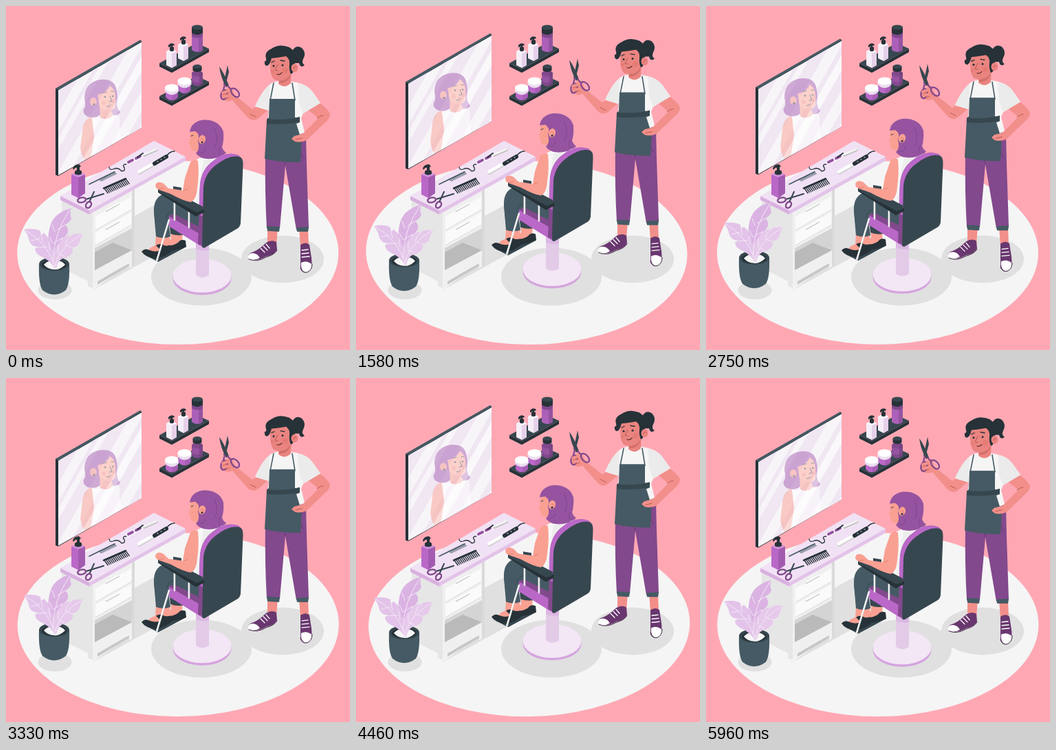
Write an HTML page that moves like this. It is 500 px wide and 500 px high and loops after 6000 ms.

```html
<!DOCTYPE html>
<html lang="en">
<head>
<meta charset="utf-8">
<title>Hair salon</title>
<style>
html, body { margin: 0; width: 100%; height: 100%; overflow: hidden; background: #ffa8b4; }
svg { display: block; width: 100%; height: 100%; }
.line { fill: none; stroke-linecap: round; stroke-linejoin: round; }
</style>
</head>
<body>
<svg viewBox="0 0 500 500">
<defs>
  <clipPath id="glass"><path d="M76 122.500 197 52.500V177L76 246Z"/></clipPath>
  <g id="shelf">
    <path fill="#263238" d="M223 83 241 92 295 62V67L241 97 223 88Z"/>
    <path fill="#37474f" d="M223 83 277 54 295 62 241 92Z"/>
  </g>
  <g id="pump">
    <path fill="#f5edf7" d="M233 66 241 62 248 66V86L241 90 233 86Z"/>
    <path fill="#e6d0ea" d="M241 69 248 66V86L241 90Z"/>
    <path fill="#faf4fb" d="M233 66 241 62 248 66 241 69Z"/>
    <path fill="#263238" d="M238 60Q241 58 244 60V65Q241 67 238 65ZM240 55H242V61H240ZM236 57Q239 53 244 55L245 57Q241 58 236 60Z"/>
  </g>
  <g id="jar">
    <path fill="#ba68c8" d="M232 123V132Q235 137 241 137 247 137 250 132V123Z"/>
    <path fill="#9553a0" opacity=".45" d="M241 137Q247 137 250 132V123H244Z"/>
    <path fill="#efe3f1" d="M231 119V124Q235 129 241 129 247 129 251 124V119Z"/>
    <ellipse cx="241" cy="119" rx="10" ry="5.500" fill="#fff"/>
    <path class="line" stroke="#d5c4da" stroke-width=".6" d="M234 124v3M237 125v3M241 126v3M245 125v3M248 124v3"/>
  </g>
</defs>

<ellipse id="floor" cx="249.800" cy="358.500" rx="233.500" ry="133.500" fill="#f5f5f5"/>
<g fill="#e0e0e0">
  <path d="M124 414 240 350V276L187 305V370Z"/>
  <ellipse cx="284" cy="393.500" rx="73" ry="42"/>
  <ellipse cx="402" cy="368" rx="60" ry="34.500"/>
  <ellipse cx="71" cy="413" rx="24.500" ry="13.500"/>
</g>

<!-- mirror -->
<g class="float">
  <path fill="#263238" d="M72 120 195 49.500 197 51V177L76 247 72 245.500Z"/>
  <path fill="#455a64" d="M72 120 195 49.500 197 51.500 76 122Z"/>
  <g clip-path="url(#glass)">
    <path fill="#f8f5f9" d="M70 40H200V250H70Z"/>
    <g id="stripes" fill="#f0e7f3"></g>
    <g opacity=".5">
      <path fill="#f9a092" d="M124 161Q112 166 111 182L108 207Q110 220 118 230L136 222 126 205 130 180Z"/>
      <path fill="#fff" d="M125 163Q138 166 151 157L161 155Q167 160 165 172L168 202 122 228 128 190Z"/>
      <path fill="#a661b2" d="M114 135Q114 111 137 107 156 105 160 119 163 132 161 143 162 150 166 154 164 159 156 159L137 158Q130 164 119 161 111 157 113 150 117 146 114 135Z"/>
      <path fill="#f9a092" d="M136 143 152 151 156 158Q148 168 137 162Z"/>
      <path fill="#ffad9e" d="M133 129Q146 127 151 116 159 121 159.500 133L159 147Q153 154 147 152L136 146Z"/>
      <ellipse cx="127" cy="139" rx="5" ry="6" fill="#f9a092"/>
      <path class="line" stroke="#37474f" stroke-width="1" d="M141 126 146 125M153 124 157 124M146 146Q150 147 152 144M151 131 154 138 150 139"/>
      <g fill="#37474f"><circle cx="144" cy="132" r="1.300"/><circle cx="155" cy="131" r="1.200"/><circle cx="128" cy="143" r="1.600"/></g>
      <g fill="#f47d72" opacity=".5"><circle cx="142" cy="141" r="3"/><circle cx="156" cy="139" r="2"/></g>
    </g>
    <path fill="#fff" opacity=".3" d="M96 250 216 40H228L108 250Z"/>
  </g>
</g>

<!-- shelves -->
<use href="#shelf"/>
<use href="#shelf" y="48"/>
<use href="#pump"/>
<use href="#pump" x="17" y="-10"/>
<path fill="#ac60b9" d="M270 39V64Q278 70 286 64V39Z"/>
<path fill="#9553a0" d="M280 40H286V64Q283 67 280 67Z"/>
<path fill="#82498c" d="M270 39V44Q278 49 286 44V39Z"/>
<path fill="#263238" d="M270 31V39Q278 45 286 39V31Z"/>
<ellipse cx="278" cy="31" rx="8" ry="3.500" fill="#37474f"/>
<use href="#jar"/>
<use href="#jar" x="18.500" y="-10"/>
<path fill="#82498c" d="M270 97Q272 94 278 94 284 94 286 97V113Q278 120 270 113Z"/>
<path fill="#9553a0" d="M270 100Q278 105 286 100V109Q278 114 270 109Z"/>
<path fill="#6e3d77" d="M281 95 286 97V113L281 116Z" opacity=".6"/>
<path fill="#263238" d="M271.500 88V94Q278 98 284.500 94V88Z"/>
<ellipse cx="278" cy="88" rx="6.500" ry="3" fill="#37474f"/>

<!-- desk -->
<path fill="#c7c7c7" d="M130 402 178 374 182 376 130 407Z"/>
<path fill="#e6e6e6" d="M81 280 126 302V410L119 407V400L88 384V390L81 386Z"/>
<path fill="#f0f0f0" d="M126 301 187 266V377L179 381V374L133 399V406L126 410Z"/>
<path fill="#dadada" d="M183 268 187 266V377L183 379Z"/>
<path fill="#fafafa" d="M130 306 182 277V295L130 325ZM130 329 182 300V317L130 347Z"/>
<path class="line" stroke="#dedede" d="M130 326 182 296.500M130 348 182 319"/>
<path class="line" stroke="#d0d0d0" stroke-width="2.500" d="M146 298 164 288M146 324 164 314"/>
<path class="line" stroke="#fff" stroke-width="1.500" d="M146 296.500 164 286.500M146 322.500 164 312.500"/>
<path fill="#d4d4d4" d="M129 352 183 323V354L129 383Z"/>
<path fill="#bababa" d="M129 358 155 344 183 355 129 384Z"/>
<path fill="#d9b0e0" d="M79 276 121 297V303L79 282Z"/>
<path fill="#e3c3e9" d="M121 297 261 219V225L121 303Z"/>
<path fill="#f1e1f4" d="M79 276 215 196 261 219 121 297Z"/>

<!-- tools -->
<g class="line">
  <path stroke="#455a64" stroke-width="1.700" d="M121 259 158 241"/>
  <path id="finecomb" stroke="#455a64" stroke-width="1"/>
  <path stroke="#263238" stroke-width="2.500" d="M142 265 174 251"/>
  <path id="widecomb" stroke="#263238" stroke-width="1.400"/>
  <path stroke="#263238" stroke-width="1.300" d="M175 230Q168 230 172 235 174 240 168 240 163 234 156 237 150 239 150 234"/>
  <path stroke="#fff" stroke-width="5" d="M177 228 199 217"/>
  <path stroke="#9553a0" stroke-width="4" d="M178 227 184 224M189 221.500 195 218.500"/>
  <path stroke="#bdbdbd" stroke-width="4" d="M201 217 219 209"/>
  <path stroke="#f5f5f5" stroke-width="2.500" d="M200 216 219 208"/>
  <path stroke="#263238" stroke-width="2" d="M191 220 199 214"/>
  <path stroke="#cfcfcf" stroke-width="6" d="M194 242 216 229"/>
  <path stroke="#fff" stroke-width="4.500" d="M193 241 216 228"/>
  <path stroke="#263238" stroke-width="6" d="M216 229 233 219"/>
  <path stroke="#263238" stroke-width="1.500" d="M234 217Q239 211 245 211"/>
  <path stroke="#fff" stroke-width="1.200" d="M220 226h1M225 223h1M230 220h1"/>
  <path stroke="#37474f" stroke-width="2" d="M116 281 142 273M121 285 128 270"/>
  <g stroke="#82498c" stroke-width="2.400">
    <ellipse cx="110" cy="282" rx="6" ry="3.500" transform="rotate(-12 110 282)"/>
    <ellipse cx="120" cy="289" rx="3.500" ry="5" transform="rotate(35 120 289)"/>
  </g>
</g>
<path fill="#ba68c8" d="M95 245 105 240 115 245V272L105 279 95 274Z"/>
<path fill="#a35bb0" d="M105 249 115 245V272L105 279Z"/>
<path fill="#cf93d9" d="M95 245 105 240 115 245 105 249Z"/>
<path fill="#263238" d="M100 240Q105 236 110 240V244Q105 247 100 244ZM103 233H107V240H103ZM97 236Q99 230 106 230L109 233Q106 236 101 235L98 238Z"/>

<!-- plant -->
<g id="plant">
  <path fill="#455a64" d="M48 375Q47 404 53 413 70 426 87 413 93 404 92 375Z"/>
  <ellipse cx="70" cy="375" rx="22" ry="10" fill="#37474f"/>
  <ellipse cx="70" cy="376" rx="18" ry="7.500" fill="#263238"/>
  <path fill="#f5f5f5" d="M55 376Q62 368 70 372 80 368 86 376 78 384 70 383 61 383 55 376Z"/>
  <path fill="#dbb3e3" d="M66 375Q59 348 62 330 64 313 73 305 82 297 95 294 92 301 95 309 92 315 86 318 91 322 90 329 87 336 81 338 76 350 72 368Z"/>
  <path fill="#e3c3e9" d="M70 379Q62 369 53 365 43 361 42 353L47 350Q37 350 34 342 32 332 26 325 40 322 50 327L51 333 55 330Q65 338 66 350 72 362 73 378Z"/>
  <path fill="#e6c9eb" d="M70 381Q66 358 76 345 84 335 93 333L91 338 97 332Q104 330 112 331 108 337 106 345 103 351 95 351 99 354 96 359 90 366 82 367 75 371 73 381Z"/>
  <g class="line" stroke="#f5e9f7" stroke-width="1">
    <path d="M68 373Q69 330 93 296M68 345 63 335M71 328 67 318M69 345 82 337M75 325 86 318"/>
    <path d="M71 377Q58 342 28 326M60 350 47 351M64 356 62 344M49 338 37 341M53 342 51 333"/>
    <path d="M71 380Q76 352 110 332M76 360 85 364M76 358 76 348M86 348 95 351M86 347 90 338"/>
  </g>
</g>

<!-- chair and client -->
<g class="float">
  <path fill="#d5a4de" d="M242.500 391V396A42.500 24 0 0 0 327.500 396V391Z"/>
  <ellipse cx="285" cy="392" rx="42.500" ry="24.500" fill="#f3e6f5"/>
  <path fill="#e3cbe8" d="M276 335H295V391Q285.500 398 276 391Z"/>
  <path fill="#d5a4de" opacity=".5" d="M276 340H295V355Q285 357 276 353Z"/>
  <path fill="#37474f" d="M208 365 243 345 262 350 221 372Z"/>
  <path fill="#f9a092" d="M240 324 257 328 256 344Q246 352 226 349 230 342 240 339ZM218 332 239 332 236 351Q224 361 207 357 207 351 217 348Z"/>
  <path fill="#263238" d="M218 348Q224 344 230 348 240 350 250 344 254 338 261 341L262 350Q244 358 226 356ZM197 357Q202 351 209 355 218 359 228 354 232 347 240 348L240 357Q230 365 218 367 203 366 197 357Z"/>
  <path fill="#37474f" d="M243 262 255 264V273L243 268Z"/>
  <path fill="#37474f" d="M236 300 262 310 260 332Q250 335 239 331Z"/>
  <path fill="#82498c" d="M230 290 246 290 285 314V336L230 306Z"/>
  <path fill="#ba68c8" d="M230 302 285 333V350L232 317Q229 313 230 302Z"/>
  <path fill="#455a64" d="M215 300Q214 282 225 275 238 271 255 278L283 290V322L248 304Q239 301 235 308L239 335Q228 339 218 335Z"/>
  <path fill="#ba68c8" d="M230 303 285 334V350L232 317Q229 313 230 303Z" />
  <path fill="#455a64" d="M215 300 230 290 237 307 236 336Q228 338 219 335Z"/>
  <path class="line" stroke="#37474f" d="M233 307Q236 299 243 297"/>
  <path fill="#f7f7f7" d="M276 224Q292 214 317 217L310 235 288 290 274 288 271 250Z"/>
  <path fill="#e3e3e3" d="M287 224 301 222 286 247 282 285 277 287Z" opacity=".5"/>

  <path fill="#f9a092" d="M270 181Q266 187 268 193L265 199 268 201Q267 212 276 211L282 220 294 211V181Z"/>
  <path fill="#9553a0" d="M267 183Q269 168 287 165.500 310 165 316 183 317 196 314 205 316 211 320 213 317 217 313 217 307 223 291 222 281 221 276 214 281 209 280 202L279 196Q283 187 275 182Z"/>
  <path class="line" stroke="#7d4587" stroke-width=".8" d="M290 206Q288 216 281 213M303 178Q310 195 303 206M313 217Q307 215 311 205"/>
  <ellipse cx="285" cy="194" rx="5" ry="6.500" transform="rotate(15 285 194)" fill="#f9a092"/>
  <path class="line" stroke="#d87569" stroke-width=".8" d="M283 194Q287 190 287 197"/>
  <circle cx="285" cy="198" r="1.500" fill="#263238"/>
  <path class="line" stroke="#263238" stroke-width=".9" d="M269 189 272 188"/>

  <path fill="#82498c" d="M279 346 282 260Q284 238 300 226 319 210 338 217L344 223 316 230 290 350Z"/>
  <path fill="#ba68c8" d="M280 303 282 260Q284 238 300 226 319 210 338 217L341 220Q321 219 304 233 290 244 288 263L286 306Z"/>
  <path fill="#37474f" d="M285 350 287 263Q289 244 304 232 324 216 339 219 345 221 344.500 231L341 316Q340 321 337 323L291 350Q287 353 285 350Z"/>

  <path class="line" stroke="#e0e0e0" stroke-width="2.600" d="M245 284V311M237 311 219 371M266 294V322"/>
  <path class="line" stroke="#fff" stroke-width="1.200" d="M244.500 284V310M236.500 311 219 369M265.500 294V321"/>
  <path fill="#263238" d="M221 263 276 293 288 296V300L276 306 221 271Z"/>
  <path fill="#37474f" d="M221 264Q224 260 230 262L285 291Q288 294 285 297L277 300 222 270Z"/>
  <path fill="#f9a092" d="M268 227Q275 221 279 225 281 244 278 265 277 281 269 285 259 284 239 273L222 267Q215 264 218 258 222 254 229 258L236 265 257 268 260 250Z"/>
  <path class="line" stroke="#d87569" stroke-width=".8" d="M259 268 264 266M222 266 229 265"/>
</g>

<!-- hairdresser -->
<g class="float">
  <g fill="#f28f8a">
    <path d="M380 323H395L393 348 380 349ZM426 324H439L440 349 428 350Z"/>
    <path d="M372 140 358 150 333 130 328 119Q324 116 321 121L313 124Q310 130 315 135 321 141 329 137L352 163Q360 169 367 163L381 151Z"/>
  </g>
  <path fill="#69376f" d="M378 344Q386 339 393 343L394 354Q390 362 378 364 365 372 353 367 350 362 355 359 366 356 378 344ZM428 347Q436 342 441 347L444 366Q446 383 439 386 430 389 428 381Z"/>
  <g fill="#fff">
    <path d="M354 360Q364 357 369 366 361 371 353 368 350 364 354 360ZM429 373Q437 369 444 375 445 387 436 387 428 386 429 373Z"/>
    <path class="line" stroke="#fff" stroke-width="1.300" d="M374 349 380 355M370 352 376 358M378 346 383 352M430 355 439 354M430 360 440 359M430 365 441 364"/>
  </g>
  <path class="line" stroke="#3d2542" stroke-width="1" d="M353 368Q365 373 378 365 390 362 394 355M428 380Q430 389 438 387 445 384 445 375"/>
  <path fill="#82498c" d="M377 214H428L430 185 436 188 437 231 440 323 422 325 406 232 398 323 379 323Q376 270 377 214Z"/>
  <path class="line" stroke="#67386f" d="M406 231 404 223M428 210Q428 218 433 222"/>
  <path fill="#455a64" d="M379 320 398 321 397 328 380 327ZM422 322 440 321 439 328 423 328Z"/>
  <path fill="#f28f8a" d="M438 150 456 141Q469 151 471 157 471 164 462 171L437 195Q429 199 420 197L415 193 419 189 431 186 454 163Z"/>
  <path class="line" stroke="#b75c52" stroke-width="1" d="M452 163Q457 159 461 159M421 194 430 192M355 157 363 161"/>
  <path fill="#f5f5f5" d="M386 112Q401 106 422 111 437 114 445 124L457 141 432 156 429 163 434 184 378 188 382 152 362 146Q373 121 386 112Z"/>
  <path fill="#ebebeb" d="M424 112Q437 114 445 124L457 141 432 156 426 141ZM383 115 382 152 362 146Q372 123 383 115Z"/>
  <path fill="#ea8480" d="M397 101 415 92 414 112Q405 121 396 113Z"/>
  <path fill="#d2706b" d="M397 107Q407 108 413 100L413 103Q407 113 397 112Z"/>
  <path class="line" stroke="#455a64" stroke-width="1.600" d="M389 112 384 137M416 112 420 137"/>
  <path fill="#455a64" d="M383 135H420V162L426 163 430 192 428 227Q400 228 376 222L379 165 382 162Z"/>
  <path fill="#37474f" d="M379 164Q406 167 427 161V169Q405 173 379 171Z"/>
  <path fill="#f5f5f5" d="M422 171 430 168 433 184 427 187Z"/>
  <path fill="#f28f8a" d="M415 193 419 189 431 186 440 178 437 195Q429 199 420 197Z"/>
  <path class="line" stroke="#b75c52" stroke-width="1" d="M421 194 430 192"/>

  <path fill="#ea8480" d="M384 78Q383 102 390 107 401 111 410 104L416 91 414 74Q399 68 384 78Z"/>
  <path fill="#263238" d="M386 76Q383 87 379 87 375 86 376 80 379 81 378 76 375 67 386 62 397 54 412 60L417 64Q422 56 430 61 437 68 432 77 429 83 434 86 428 91 426 83L420 83 417 97 414 99Q411 92 412 85 413 77 407 73 396 75 386 76Z"/>
  <ellipse cx="419.500" cy="90" rx="5" ry="6" fill="#ea8480"/>
  <path class="line" stroke="#b75c52" stroke-width="1" d="M418 91Q420 86 422 89M395 85 391 93 395 94"/>
  <path class="line" stroke="#263238" stroke-width="1.300" d="M386 82 390 80M399 79 405 80"/>
  <path class="line" stroke="#63302d" stroke-width="1.200" d="M394 99Q397 101 401 97"/>
  <g fill="#263238"><circle cx="389" cy="87" r="1.500"/><circle cx="402" cy="86" r="1.500"/></g>
  <g fill="#dc695e" opacity=".3"><circle cx="406" cy="94" r="4"/><circle cx="387" cy="95" r="2.500"/></g>

  <path fill="#37474f" d="M322 86 324 96 319 115 316 114ZM310 88Q317 97 324 116L320 118Q312 104 310 88Z"/>
  <g class="line" stroke="#82498c" stroke-width="2.300">
    <path d="M318 114 316 122M322 116 327 121"/>
    <ellipse cx="317" cy="129" rx="4.500" ry="7" transform="rotate(12 317 129)"/>
    <ellipse cx="333" cy="126" rx="4.500" ry="7.500" transform="rotate(-43 333 126)"/>
  </g>
  <path class="line" stroke="#f28f8a" stroke-width="4" d="M315 126 322 124M317 132 324 130"/>
  <path class="line" stroke="#b75c52" stroke-width=".8" d="M316 128.500 323 127M319 134.500 325 133"/>
</g>
</svg>
<script>
const $ = id => document.getElementById(id);

// n parallel teeth starting along a line
const teeth = (n, x, y, dx, dy, tx, ty) =>
  Array.from({ length: n }, (_, i) => `M${x + i * dx} ${y + i * dy}l${tx} ${ty}`).join('');
$('finecomb').setAttribute('d', teeth(13, 135, 252, 1.8, -0.87, 4, 2.5));
$('widecomb').setAttribute('d', teeth(14, 143, 265, 2.4, -1.05, 5, 7));

// slanted reflections: left edge at the mirror's foot, and width
$('stripes').innerHTML = [[-14, 9], [5, 17], [37, 6], [52, 19], [88, 8], [109, 16], [142, 10], [165, 16]]
  .map(([x, w]) => `<path d="M${x} 250h${w}l120-210h${-w}Z"/>`).join('');

const lift = (t, period) => 10 * (1 - Math.abs(1 - 2 * (t % period) / period));
const floats = document.querySelectorAll('.float');
const start = performance.now();

function draw(now) {
  const t = Math.max(0, now - start);
  const up = lift(t, 3000);
  floats.forEach(g => g.setAttribute('transform', `translate(0 ${-up})`));
  $('plant').setAttribute('transform', `translate(0 ${-lift(t, 6000)})`);
  const tilt = 1 - 4 * Math.abs((t / 6000 + 0.25) % 1 - 0.5);
  $('floor').setAttribute('transform', `rotate(${tilt} 250 250)`);
  requestAnimationFrame(draw);
}
draw(start);
</script>
</body>
</html>
```
